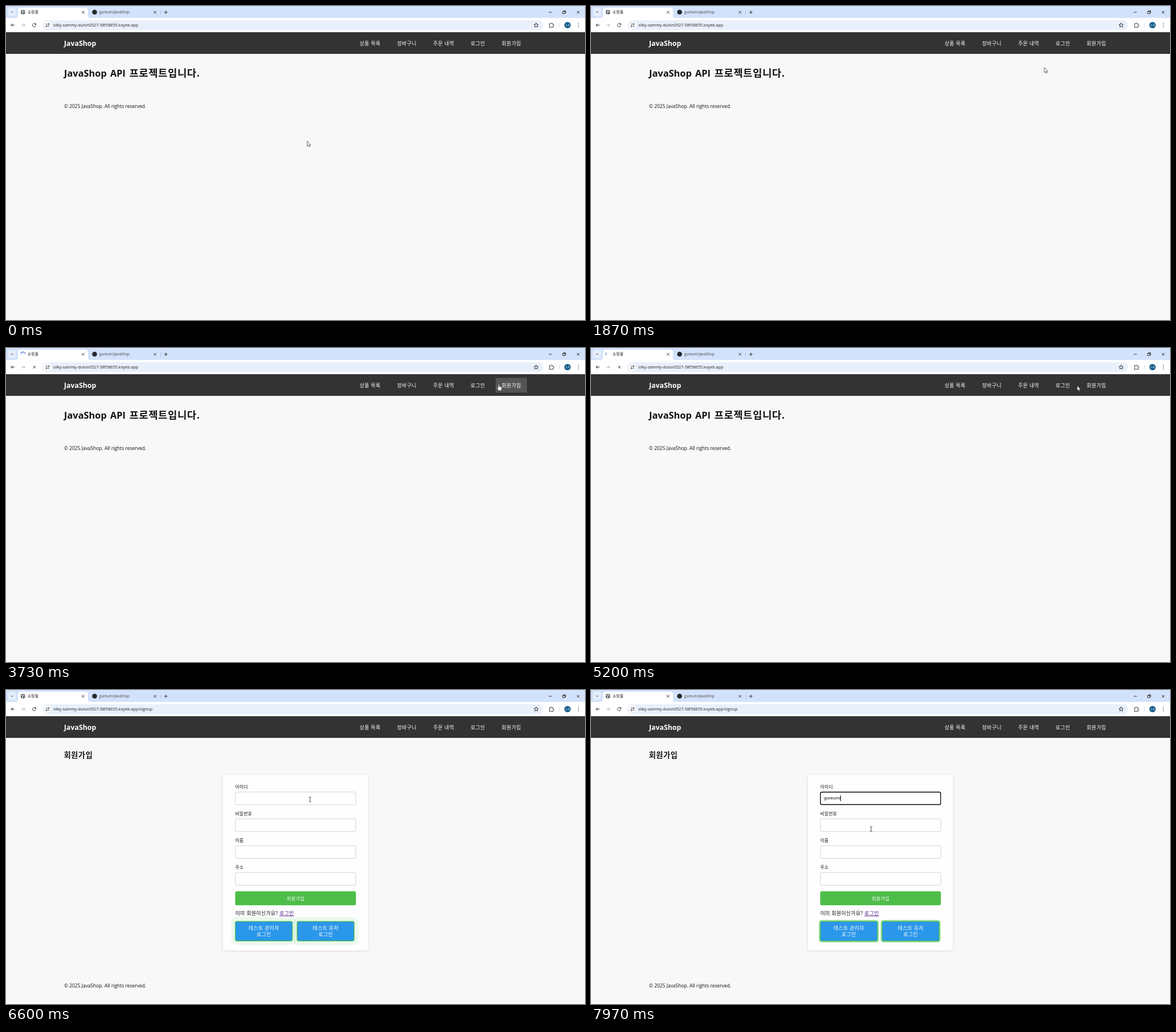
Animation of 1017 by 551 pixels, one loop 8000 ms. Source, as an HTML page:

```html
<!DOCTYPE html>
<html lang="ko">
<head>
<meta charset="utf-8">
<title>쇼핑몰</title>
<style>
  html, body { margin: 0; width: 100%; height: 100%; overflow: hidden; background: #f8f8f8; }
  svg { position: absolute; left: 0; top: 0; display: block; }
  text { font-family: "Open Sans", "Noto Sans CJK KR", "Noto Sans CJK", sans-serif; font-size: 8.45px; fill: #111; }
  .ko { font-size: 8.9px; letter-spacing: .04em; }
  .bold { font-weight: 700; }
  .light { fill: #fff; }
  .mid { text-anchor: middle; }
  .line { fill: none; stroke: #333; stroke-width: 1; }

  /* Page states */
  .home, .signup, .loading, .idle, .hover, .focus, .arrow, .hand, .beam {
    animation: 8s step-end infinite;
  }
  .home { animation-name: home; }
  .signup { animation-name: signup; }
  .loading { animation-name: loading; }
  .idle { animation-name: idle; }
  .hover, .hand { animation-name: hover; }
  .focus { animation-name: focus; }
  .arrow { animation-name: arrow; }
  .beam { animation-name: beam; }
  @keyframes home { 0% { visibility: visible } 73.75%, 100% { visibility: hidden } }
  @keyframes signup { 0% { visibility: hidden } 73.75%, 100% { visibility: visible } }
  @keyframes loading { 0% { visibility: hidden } 33.5% { visibility: visible } 73.75%, 100% { visibility: hidden } }
  @keyframes idle { 0% { visibility: visible } 33.5% { visibility: hidden } 73.75%, 100% { visibility: visible } }
  @keyframes hover { 0% { visibility: hidden } 29.8% { visibility: visible } 55.5%, 100% { visibility: hidden } }
  @keyframes focus { 0% { visibility: hidden } 85% { visibility: visible } 100% { visibility: visible } }
  @keyframes arrow {
    0% { visibility: visible } 29.8% { visibility: hidden }
    55.5% { visibility: visible } 81.3%, 100% { visibility: hidden }
  }
  @keyframes beam { 0% { visibility: hidden } 81.3%, 100% { visibility: visible } }

  /* Pointer path */
  .pointer { animation: travel 8s infinite; }
  @keyframes travel {
    0%, 19.1% { transform: translate(529px, 237px); animation-timing-function: ease-in }
    23.375% { transform: translate(796px, 108px); animation-timing-function: ease-out }
    30.5%, 55% { transform: translate(865.5px, 64px); animation-timing-function: ease-in-out }
    57%, 77.5% { transform: translate(854px, 66px); animation-timing-function: ease-in-out }
    82%, 95% { transform: translate(534px, 192px); animation-timing-function: ease-in-out }
    99%, 100% { transform: translate(492px, 244px) }
  }

  /* Tab throbber */
  .turn, .leap, .arc { animation: turn 1.6s linear -1237.33ms infinite; }
  .leap { animation-name: leap; animation-duration: 8s; animation-timing-function: steps(6); }
  .arc { animation-name: sweep; animation-duration: 1333.333ms; animation-timing-function: ease-in-out; }
  @keyframes turn { to { transform: rotate(360deg) } }
  @keyframes leap { to { transform: rotate(1590deg) } }
  @keyframes sweep {
    0% { stroke-dasharray: 5 360; stroke-dashoffset: 0 }
    50% { stroke-dasharray: 270 360; stroke-dashoffset: 0 }
    100% { stroke-dasharray: 5 360; stroke-dashoffset: -265 }
  }

  .glow { fill: none; stroke: #4ccb58; animation: pulse 8s infinite; }
  @keyframes pulse {
    0%, 73.75% { stroke-width: 1px; stroke-opacity: .7; animation-timing-function: ease }
    89.5% { stroke-width: 16px; stroke-opacity: 0; animation-timing-function: step-end }
    96.25% { stroke-width: 1px; stroke-opacity: .7; animation-timing-function: ease-in }
    100% { stroke-width: 5px; stroke-opacity: .5 }
  }

  .entry {
    position: absolute; left: 409px; top: 185px; height: 9.5px;
    border-right: .7px solid #111; font: 8px/9.5px "Liberation Sans", sans-serif; color: #111;
  }
  .entry::before { content: ""; animation: typing 8s step-end infinite; }
  @keyframes typing {
    0% { content: "" }
    88% { content: "g" }
    89.3% { content: "gu" }
    90.5% { content: "gur" }
    91.6% { content: "gure" }
    92.8% { content: "gureu" }
    93.9% { content: "gureum" }
    95%, 100% { content: "gureumi" }
  }
</style>
</head>
<body>
<svg width="1017" height="551" viewBox="0 0 1017 551">
  <defs>
    <path id="cross" class="line" d="M-2.2-2.2 2.2 2.2M2.2-2.2-2.2 2.2"/>
    <rect id="field" x="403" width="211.5" height="22.3" rx="2.5" fill="#fff" stroke="#cfcfd4" stroke-width=".9"/>
    <filter id="shade" x="-10%" y="-10%" width="120%" height="120%">
      <feDropShadow dx="0" dy="1" stdDeviation="2" flood-opacity=".12"/>
    </filter>
  </defs>

  <!-- Tab strip -->
  <path fill="#d3e2fc" d="M0 0H1017V22H0Z"/>
  <rect x="4" y="3.5" width="13.5" height="14" rx="4" fill="#e6eefd"/>
  <path class="line" d="M8.7 9.8 10.7 11.8 12.7 9.8"/>
  <path fill="#fff" d="M17 21Q21 21 21 17V8Q21 3 26 3H139Q144 3 144 8V17Q144 21 148 21Z"/>
  <g class="idle">
    <circle cx="29.8" cy="10.8" r="4" fill="#555b61"/>
    <path d="M26.6 9.5Q29 10 29.5 11.5T28.5 14M30 7.3Q29.5 9.5 31.3 9.7T33.3 11.5" fill="none" stroke="#fff" stroke-width="1.1"/>
  </g>
  <g class="loading" transform="translate(29.8 11) rotate(-29)">
    <g class="turn"><g class="leap">
      <circle class="arc" r="4" pathLength="360" fill="none" stroke="#2f62c9" stroke-width="1.2"/>
    </g></g>
  </g>
  <text class="ko" x="38" y="13.4" style="font-size:6.6px">쇼핑몰</text>
  <use href="#cross" x="135.5" y="11"/>
  <circle cx="155.6" cy="10.8" r="4.3" fill="#24292f"/>
  <text x="164" y="13.4" style="font-size:6.2px;fill:#444">gureumi/JavaShop</text>
  <use href="#cross" x="261.7" y="11"/>
  <path d="M271.5 7V15" stroke="#a5b8d8" stroke-width=".8"/>
  <path class="line" d="M277.8 11H283.8M280.8 8V14M953.3 11H958.7"/>
  <path class="line" stroke-width=".8" d="M977.7 9.6H981.7V13.4H977.7ZM979 9.5V8.4H983V12.2H981.8"/>
  <use href="#cross" x="1005" y="11"/>

  <!-- Toolbar -->
  <path fill="#fff" d="M0 21H1017V46H0Z"/>
  <path class="line" d="M15 33.5H9M11.7 30.7 8.9 33.5 11.7 36.3"/>
  <path class="line" style="stroke:#b4b4b4" d="M27 33.5H33M30.3 30.7 33.1 33.5 30.3 36.3"/>
  <g class="idle">
    <path class="line" d="M52.2 32A3 3 0 1 0 52.5 34.3"/>
    <path fill="#333" d="M53 30V33H50Z"/>
  </g>
  <g class="loading"><use href="#cross" x="49.8" y="33.5"/></g>
  <rect x="64" y="25" width="879.5" height="17.3" rx="8.6" fill="#e9f0fb"/>
  <circle cx="73" cy="33.6" r="6.3" fill="#fff"/>
  <path class="line" stroke-width=".9" d="M69.8 31.8H72.3M73.8 35.4H76.3"/>
  <circle class="line" cx="74.8" cy="31.8" r="1.2"/>
  <circle class="line" cx="71.2" cy="35.4" r="1.2"/>
  <text x="83" y="36.1" style="font-size:7.2px;fill:#222">silky-sammy-dulon0527-58f58655.koyeb.app<tspan class="signup">/signup</tspan></text>
  <path class="line" stroke-width=".8" d="M931.2 29.7 932.3 32.2 935 32.5 933 34.3 933.6 37 931.2 35.6 928.8 37 929.4 34.3 927.4 32.5 930.1 32.2Z"/>
  <path class="line" d="M954.5 31.2H956.5A1.2 1.2 0 0 1 959 31.2H961V33A1.2 1.2 0 0 1 961 35.4V37.3H954.5V35.3A1.2 1.2 0 0 0 954.5 33Z"/>
  <path d="M972 29.5V37.5" stroke="#c5d3ea" stroke-width=".8"/>
  <circle cx="986.3" cy="33.5" r="5.6" fill="#155d8c"/>
  <text class="ko light mid" x="986.4" y="35.2" style="font-size:4.4px">누리</text>
  <path d="M1005.4 30.3v.01M1005.4 33.5v.01M1005.4 36.7v.01" stroke="#333" stroke-width="1.5" stroke-linecap="round"/>

  <!-- Site header -->
  <path fill="#333" d="M0 46H1017V84H0Z"/>
  <rect class="hover" x="860" y="52.5" width="55" height="25.8" fill="#555"/>
  <text class="bold light" x="102" y="70.4" style="font-size:12.3px">JavaShop</text>
  <g class="nav">
    <text class="ko light" x="621" y="69">상품 목록</text>
    <text class="ko light" x="687" y="69">장바구니</text>
    <text class="ko light" x="750.3" y="69">주문 내역</text>
    <text class="ko light" x="816" y="69">로그인</text>
    <text class="ko light" x="870.6" y="69">회원가입</text>
  </g>

  <!-- Home -->
  <g class="home">
    <text class="bold" x="102" y="124" style="font-size:16.4px">JavaShop</text>
    <text class="bold" x="183" y="124" style="font-size:16.4px">API</text>
    <text class="ko bold" x="216.7" y="124" style="font-size:17.6px">프로젝트입니다.</text>
    <text x="102" y="179">© 2025 JavaShop. All rights reserved.</text>
  </g>

  <!-- Sign-up -->
  <g class="signup">
    <text class="ko bold" x="101.7" y="118.8" style="font-size:13.2px">회원가입</text>
    <rect x="381" y="149" width="254.5" height="308" rx="4.5" fill="#fefefe" filter="url(#shade)"/>
    <g style="font-weight:500">
      <text class="ko" x="402.7" y="172.6" style="font-size:7.7px">아이디</text>
      <text class="ko" x="402.7" y="219.8" style="font-size:7.7px">비밀번호</text>
      <text class="ko" x="402.7" y="267" style="font-size:7.7px">이름</text>
      <text class="ko" x="402.7" y="314.2" style="font-size:7.7px">주소</text>
    </g>
    <use href="#field" y="179"/>
    <use href="#field" y="226"/>
    <use href="#field" y="273.2"/>
    <use href="#field" y="320.3"/>
    <rect x="402.6" y="353.3" width="212" height="24.4" rx="2.5" fill="#4dbd49"/>
    <text class="ko light mid" x="508.7" y="368.6" style="font-size:8.2px">회원가입</text>
    <text class="ko" x="402.7" y="395.2">이미 회원이신가요?</text>
    <text class="ko" x="480.2" y="395.2" style="fill:#551a8b;text-decoration:underline">로그인</text>
    <rect class="glow" x="402.3" y="405.6" width="101.2" height="35.2" rx="3"/>
    <rect class="glow" x="510.8" y="405.6" width="101.2" height="35.2" rx="3"/>
    <g fill="#2b97ea" stroke="#4dbd49" stroke-width="1.2">
      <rect x="402.8" y="406.1" width="100.2" height="34.2" rx="2.5"/>
      <rect x="511.3" y="406.1" width="100.2" height="34.2" rx="2.5"/>
    </g>
    <text class="ko light mid" x="453" y="421.2">테스트 관리자</text>
    <text class="ko light mid" x="453" y="432.3">로그인</text>
    <text class="ko light mid" x="561.5" y="421.2">테스트 유저</text>
    <text class="ko light mid" x="561.5" y="432.3">로그인</text>
    <text x="102" y="522">© 2025 JavaShop. All rights reserved.</text>
  </g>
  <rect class="focus" x="403" y="179.2" width="211.2" height="21.8" rx="2.5" fill="#fff" stroke="#111" stroke-width="1.4"/>
</svg>

<div class="entry focus"></div>

<svg width="1017" height="551" viewBox="0 0 1017 551">
  <g class="pointer">
    <path class="arrow" d="M0 0V9L2 7.2 3.4 10.2 4.8 9.6 3.5 6.7H6.2Z" fill="#fff" stroke="#222" stroke-width=".7"/>
    <path class="hand" d="M-.9 0Q0-1 .9 0V3.4L4.2 4.2Q5.5 4.6 5.3 6L4.6 9.3V10.8H-.6V9.5L-3 6.6Q-3 5.2-1.6 5.6L-.9 6.3Z" fill="#fff" stroke="#222" stroke-width=".5"/>
    <path class="beam" d="M-2-4H-.6L0-3.5.6-4H2M0-3.5V3.5M-2 4H-.6L0 3.5.6 4H2" fill="none" stroke="#222" stroke-width=".8"/>
  </g>
</svg>
</body>
</html>
```
